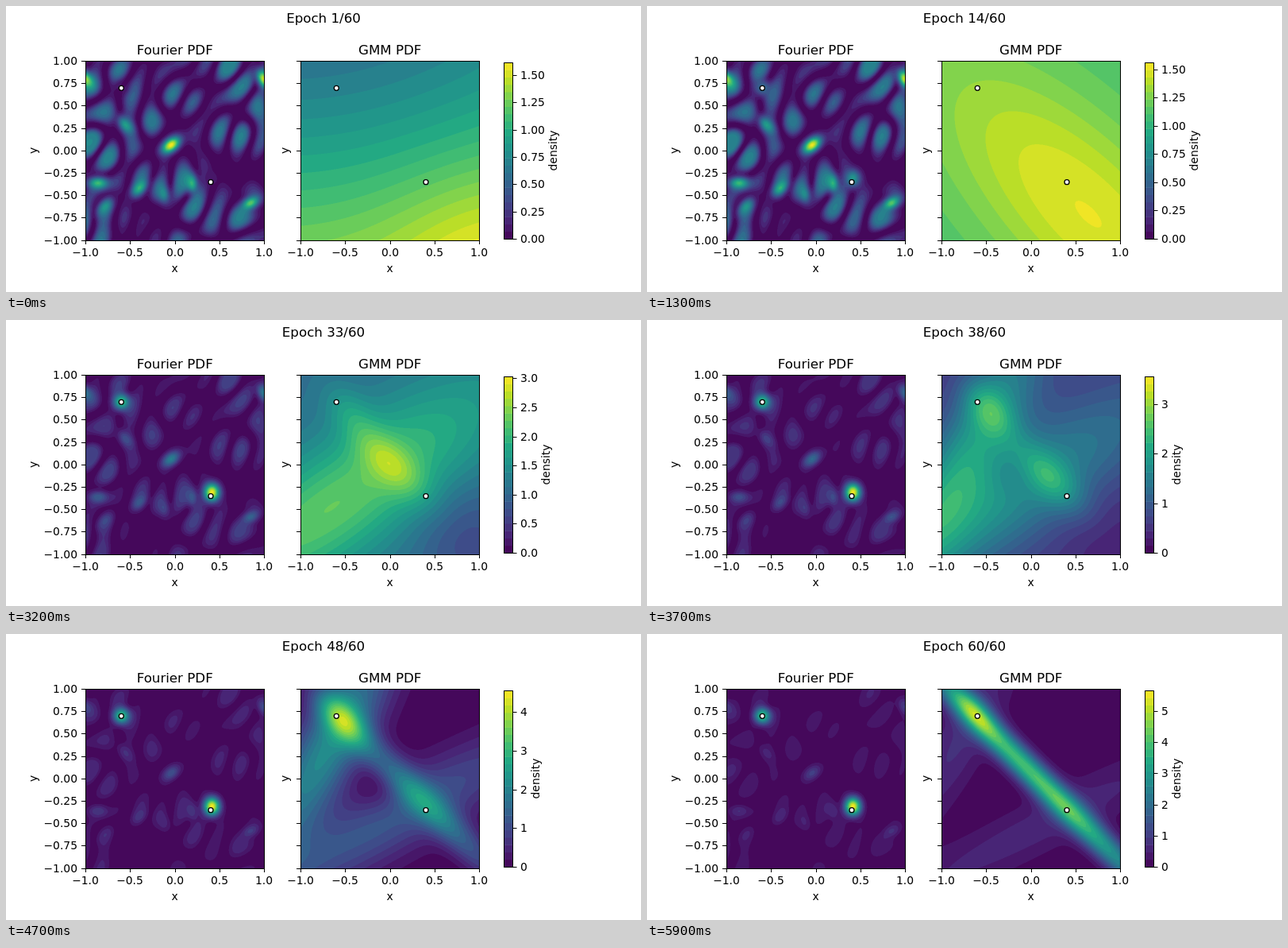
An HTML page with a canvas that plays this animation: 800 by 360 pixels, repeating every 6 s.

```html
<!DOCTYPE html>
<html lang="en">
<head>
<meta charset="utf-8">
<title>Density fit</title>
<style>
html, body { margin: 0; width: 100%; height: 100%; overflow: hidden; background: #fff; }
canvas, svg { position: absolute; left: 0; top: 0; }
canvas { width: 225px; height: 225px; top: 70px; }
#fourier { left: 100px; }
#gmm { left: 371px; }
text { font: 13.89px "DejaVu Sans", sans-serif; text-anchor: middle; }
.title { font-size: 16.67px; }
.end { text-anchor: end; }
.start { text-anchor: start; }
.line { fill: none; stroke: #000; }
.dot { fill: #fff; stroke: #000; stroke-width: 1.3; }
</style>
</head>
<body>
<canvas id="fourier" width="450" height="450"></canvas>
<canvas id="gmm" width="450" height="450"></canvas>
<svg id="stage" width="800" height="360" viewBox="0 0 800 360"></svg>
<script>
const SIZE = 225, RES = 2, N = SIZE * RES, BANDS = 24, EPOCHS = 60, STEP = 100;
const BAR = { x: 627.5, top: 71, bottom: 293, width: 11 };
const stage = document.getElementById('stage');

// ---------- colours ----------
const viridis = ['440154', '482475', '414487', '355f8d', '2a788e', '21918c',
  '22a884', '44bf70', '7ad151', 'bddf26', 'fde725']
  .map(h => [0, 2, 4].map(i => parseInt(h.slice(i, i + 2), 16)));

const mix = (a, b, f) => a + (b - a) * f;
const shade = u => {
  const p = u * 10, i = Math.min(9, Math.floor(p));
  return viridis[i].map((c, k) => Math.round(mix(c, viridis[i + 1][k], p - i)));
};
const palette = Array.from({ length: BANDS }, (_, i) => shade((i + 0.5) / BANDS));

// ---------- motion, t in seconds ----------
const ramp = (t, a, b) => Math.max(0, Math.min(1, (t - a) / (b - a)));
const smooth = f => f * f * (3 - 2 * f);

const peakDensity = t => {
  const u = t - 2.4;
  return Math.max(1.617 - 0.042 * t, 2.145 + u * (1.14 - 0.039 * u));
};
const fade = t => 1 - 0.35 * smooth(t / 5.9);
const growth = t => Math.min(peakDensity(t) * 0.99, 0.1 + 0.2 * t + 0.27 * t * t);

// the diagonal ridge: time, height, x, y, long sigma, short sigma
const ridgeKeys = [
  [0, 0.22, 235, 245, 90, 90],
  [1.3, 0.4, 185, 192, 190, 74],
  [2.4, 0.65, 75, 78, 105, 26],
  [3.2, 0.65, 112, 109, 42, 18],
  [4.2, 1.1, 160, 146, 38, 17],
  [5.2, 2.2, 150, 134, 160, 12],
  [5.9, 4, 125, 116, 150, 12]];

function ridge(t) {
  const i = Math.max(1, ridgeKeys.findIndex(k => k[0] >= t));
  const a = ridgeKeys[i - 1], b = ridgeKeys[i], f = ramp(t, a[0], b[0]);
  return a.map((v, k) => mix(v, b[k], f)).slice(1).concat(45);
}

const base = t => mix(1.945, 1.1, ramp(t, 0, 1.3)) + 0.3 * ramp(t, 1.3, 2.4) - 1.4 * ramp(t, 2.9, 4.2);

function mixture(t) {
  const part = ramp(t, 4.2, 5.4), turn = ramp(t, 3.2, 5.2), slide = ramp(t, 2.4, 3.2);
  const steep = 2.5 * ramp(t, 3.2, 4.2) * (1 - 0.75 * ramp(t, 4.4, 6));
  const flat = 1.2 * slide * (1 - 0.5 * ramp(t, 5.2, 5.9));
  const hollow = 0.2 * ramp(t, 1.6, 2.4) + 0.2 * slide - 0.4 * ramp(t, 3.2, 4.2);
  const gap = 0.6 * ramp(t, 3.4, 4.2) * (1 - ramp(t, 4.2, 5.2));
  return [
    ridge(t),
    [-1.5 * (1 - ramp(t, 0, 1.3)), -20, -150, 475, 300, 0],
    [1.7 * ramp(t, 2.8, 4.6), mix(60, 41, part), mix(43, 27, part), 29, mix(17, 11, part), 50],
    [steep, mix(40, 22, part), mix(85, 65, part), mix(130, 95, part), mix(32, 24, part), -61],
    [flat, mix(40, 120, turn), mix(165, 174, turn), 180, mix(52, 24, turn), mix(-35, -27, turn)],
    [-hollow, mix(225, 210, slide), mix(135, 205, slide), 45, 48, 0],
    [-gap, 95, 125, 22, 20, 0]
  ];
}

// ---------- fields ----------
function eachPoint(fn) {
  for (let j = 0, k = 0; j < N; j++) {
    for (let i = 0; i < N; i++, k++) fn(k, (i + 0.5) / RES, (j + 0.5) / RES);
  }
}

function addGauss(field, [h, cx, cy, long, short, deg]) {
  if (!h) return;
  const a = deg * Math.PI / 180, c = Math.cos(a), s = Math.sin(a);
  eachPoint((k, x, y) => {
    const dx = x - cx, dy = y - cy;
    const p = (c * dx + s * dy) / long, q = (c * dy - s * dx) / short;
    const e = (p * p + q * q) / 2;
    if (e < 9) field[k] += h * Math.exp(-e);
  });
}

const single = (...g) => {
  const field = new Float32Array(N * N);
  addGauss(field, g);
  return field;
};

// the brightest ripples: x, y, height, angle
const crests = [
  [108, 105, 1.6, -38], [0, 22, 1.4, 50], [225, 22, 1.5, 60], [16, 153, 1.1, 0], [68, 159, 1.05, -50],
  [134, 153, 1.05, 80], [208, 178, 1.2, -30], [25, 183, 0.85, -52], [51, 80, 0.9, 50], [98, 166, 0.8, 75]];

function ripples() {
  const field = new Float32Array(N * N);
  let seed = 11;
  const rand = () => (seed = seed * 16807 % 2147483647) / 2147483647;
  const waves = Array.from({ length: 14 }, () => {
    const a = rand() * Math.PI, k = 0.08 + 0.07 * rand();
    return [k * Math.cos(a), k * Math.sin(a), rand() * 2 * Math.PI];
  });
  eachPoint((k, x, y) => {
    let n = 0;
    for (const [u, v, w] of waves) n += Math.cos(u * x + v * y + w);
    field[k] = 0.75 * Math.tanh(0.045 * n * n);
  });
  for (const [x, y, h, deg] of crests) {
    single(1, x, y, 9, 5.5, deg).forEach((g, k) => { field[k] = mix(field[k], h, g); });
  }
  return field;
}

const backdrop = ripples();
const spotA = single(1, 45.5, 33, 7.2, 7.2, 0);
const spotB = single(1, 159.5, 147, 7, 8, 0);

const painter = id => {
  const ctx = document.getElementById(id).getContext('2d');
  const img = ctx.createImageData(N, N);
  return (field, max) => {
    for (let k = 0, o = 0; k < field.length; k++, o += 4) {
      const band = Math.max(0, Math.min(BANDS - 1, Math.floor(field[k] / max * BANDS)));
      const c = palette[band];
      img.data[o] = c[0];
      img.data[o + 1] = c[1];
      img.data[o + 2] = c[2];
      img.data[o + 3] = 255;
    }
    ctx.putImageData(img, 0, 0);
  };
};
const paintFourier = painter('fourier'), paintGmm = painter('gmm');
const work = new Float32Array(N * N);

// ---------- axes and labels ----------
function add(parent, tag, attrs, text) {
  const el = document.createElementNS('http://www.w3.org/2000/svg', tag);
  for (const name in attrs) el.setAttribute(name, attrs[name]);
  if (text !== undefined) el.textContent = text;
  return parent.appendChild(el);
}
const label = (parent, x, y, text, cls = '') => add(parent, 'text', { x, y, class: cls }, text);
const line = (parent, d) => add(parent, 'path', { d, class: 'line' });
const turned = x => `translate(${x} 182) rotate(-90)`;
const upright = (x, text) => add(stage, 'text', { transform: turned(x) }, text);
const signed = (v, digits) => (v < 0 ? '\u2212' : '') + Math.abs(v).toFixed(digits);

function axes(left, title, withLabels) {
  add(stage, 'rect', { x: left + 0.5, y: 69.5, width: 225, height: 226, class: 'line' });
  label(stage, left + 112.7, 61, title, 'title');
  label(stage, left + 112.7, 335, 'x');
  for (let i = 0; i < 5; i++) {
    const x = left + Math.round(i * 56.3);
    line(stage, `M${x + 0.5} 295v5`);
    label(stage, x, 315, signed(i / 2 - 1, 1));
  }
  for (let i = 0; i < 9; i++) {
    const y = 69 + Math.round(i * 28.2);
    line(stage, `M${left} ${y + 0.5}h-5`);
    if (withLabels) label(stage, left - 10, y + 5, signed(1 - i / 4, 2), 'end');
  }
  for (const [x, y] of [[-0.6, 0.7], [0.4, -0.35]]) {
    add(stage, 'circle', { cx: left + 112.9 + x * 112.7, cy: 182.2 - y * 112.7, r: 3, class: 'dot' });
  }
}

const heading = label(stage, 400, 21, '', 'title');
axes(100, 'Fourier PDF', true);
axes(371, 'GMM PDF', false);
upright(39, 'y');
upright(356, 'y');

const barHeight = BAR.bottom - BAR.top, cell = barHeight / BANDS;
palette.forEach((c, i) => add(stage, 'rect', {
  x: BAR.x, y: BAR.bottom - (i + 1) * cell, width: BAR.width, height: cell + (i ? 0.5 : 0), fill: `rgb(${c})`
}));
add(stage, 'rect', { x: BAR.x, y: 71.5, width: BAR.width, height: 222, class: 'line' });
const scale = add(stage, 'g', {});
const density = upright(694, 'density');

function drawScale(max) {
  const [step, digits, x] = max <= 1.75 ? [0.25, 2, 694] : max <= 3.5 ? [0.5, 1, 685] : [1, 0, 672];
  scale.replaceChildren();
  for (let v = 0; v <= max; v += step) {
    const y = Math.round(BAR.bottom - v / max * barHeight);
    line(scale, `M638.5 ${y + 0.5}h5`);
    label(scale, 648, y + 5, v.toFixed(digits), 'start');
  }
  density.setAttribute('transform', turned(x));
}

// ---------- playback ----------
function draw(epoch) {
  const t = epoch * STEP / 1000, max = peakDensity(t), level = fade(t), b = growth(t);
  heading.textContent = `Epoch ${epoch + 1}/${EPOCHS}`;
  drawScale(max);
  for (let k = 0; k < work.length; k++) {
    const rest = level * backdrop[k] * (1 - spotA[k]) * (1 - spotB[k]);
    work[k] = rest + b * (0.7 * spotA[k] + spotB[k]);
  }
  paintFourier(work, max);
  work.fill(base(t));
  for (const part of mixture(t)) addGauss(work, part);
  paintGmm(work, max);
}

let shown = -1;
const start = performance.now();
function tick() {
  const epoch = Math.floor((performance.now() - start) / STEP) % EPOCHS;
  if (epoch !== shown) draw(shown = epoch);
  requestAnimationFrame(tick);
}
tick();
</script>
</body>
</html>
```
